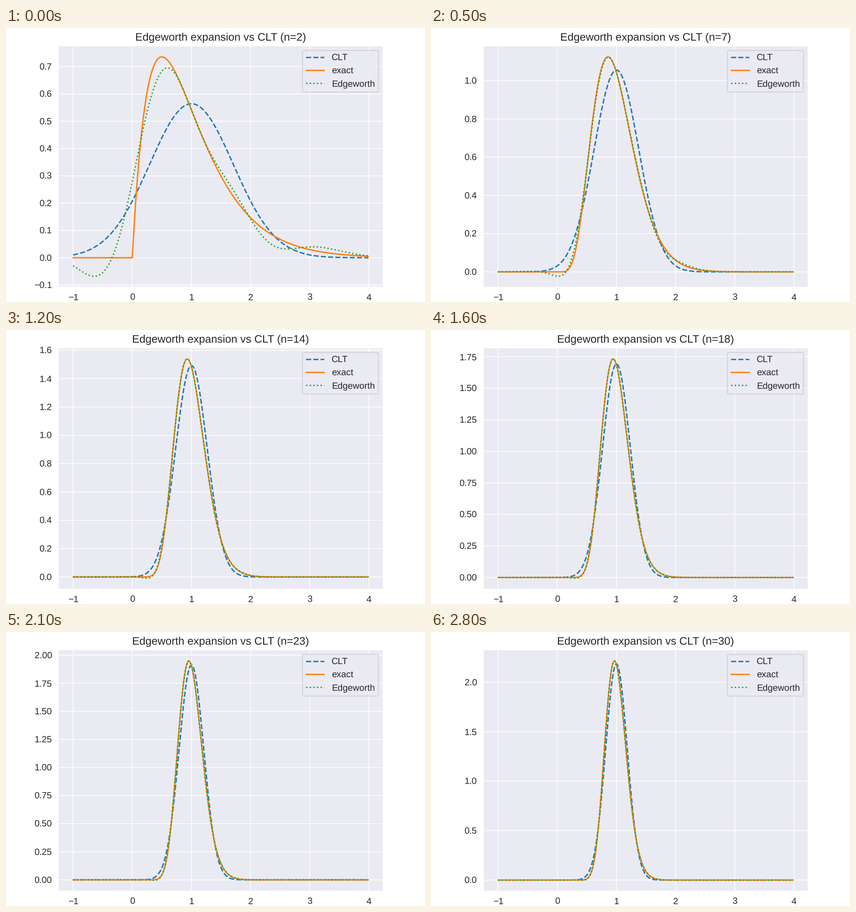
Animation of 924 by 606 pixels, one loop 2900 ms. Source, as a matplotlib script:

```python
import math

import numpy as np
import matplotlib.pyplot as plt
from matplotlib.animation import FuncAnimation

WIDTH, HEIGHT = 924, 606
DPI = 144.375
INK = "0.15"

plt.rcParams.update({
    "font.family": "Liberation Sans",
    "font.size": 10,
    "text.color": INK,
    "text.hinting": "no_hinting",
    "path.snap": False,
    "axes.facecolor": "#EAEAF2",
    "axes.edgecolor": "white",
    "axes.axisbelow": True,
    "axes.grid": True,
    "grid.color": "white",
    "grid.linestyle": "-",
    "xtick.color": INK,
    "ytick.color": INK,
    "xtick.bottom": False,
    "ytick.left": False,
    "lines.solid_capstyle": "round",
})

x = np.arange(-1, 4, 0.01)


def normal(n):
    """Normal limit of the mean of n unit exponentials."""
    return math.sqrt(n / (2 * math.pi)) * np.exp(-n * (x - 1) ** 2 / 2)


def exact(n):
    """Gamma density of the mean."""
    t = np.maximum(x, 0)
    return n ** n / math.factorial(n - 1) * t ** (n - 1) * np.exp(-n * t)


def edgeworth(n):
    """Normal density corrected for skewness and kurtosis."""
    z = (x - 1) * math.sqrt(n)
    skew, kurt = 2 / math.sqrt(n), 6 / n
    he3 = z ** 3 - 3 * z
    he4 = z ** 4 - 6 * z ** 2 + 3
    he6 = z ** 6 - 15 * z ** 4 + 45 * z ** 2 - 15
    return normal(n) * (1 + skew / 6 * he3 + kurt / 24 * he4 + skew ** 2 / 72 * he6)


fig = plt.figure(figsize=(WIDTH / DPI, 4.19741), dpi=DPI, facecolor="white")
top, bottom = 39.66, 573.27
ax = fig.add_axes([0.125, 1 - bottom / HEIGHT, 0.775, (bottom - top) / HEIGHT])


def draw(i):
    n = i + 2
    ax.clear()
    ax.plot(x, normal(n), "--", color="tab:blue", label="CLT")
    ax.plot(x, exact(n), "-", color="tab:orange", label="exact")
    ax.plot(x, edgeworth(n), ":", color="tab:green", label="Edgeworth")
    ax.set_title(f"Edgeworth expansion vs CLT (n={n})")
    ax.legend(loc="upper right")
    return []


anim = FuncAnimation(fig, draw, frames=29, init_func=lambda: draw(0),
                     interval=100, repeat=True, repeat_delay=0)
plt.show()
```
